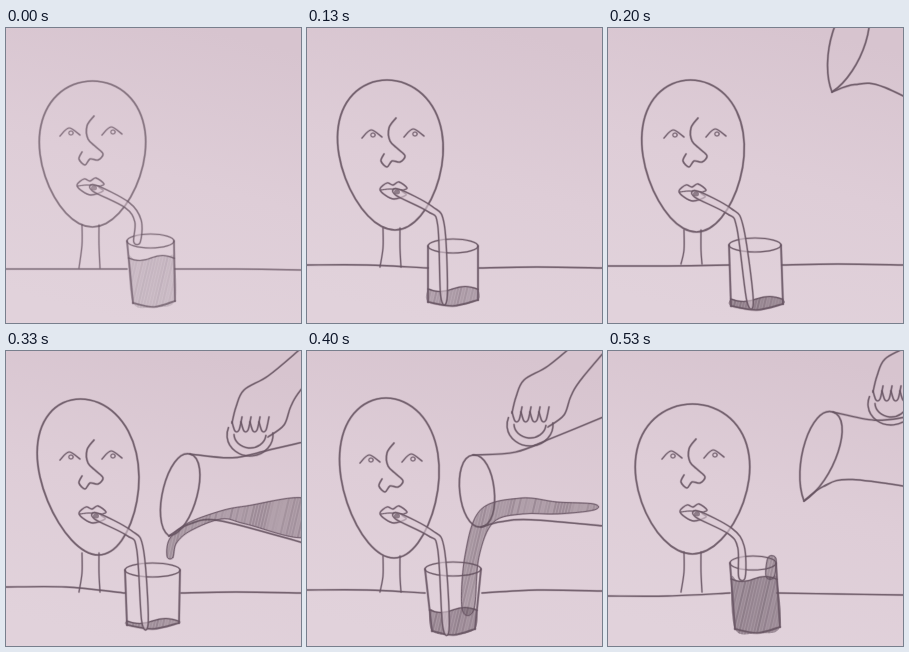
Animation, 295 px wide and 295 px high, one loop 590 ms. Source, as an HTML page with a canvas:

```html
<!DOCTYPE html>
<html lang="en">
<head>
<meta charset="utf-8">
<title>Refill</title>
<style>
  html, body { margin: 0; width: 100%; height: 100%; overflow: hidden; background: #dfcdd8; }
  canvas { display: block; width: 100vw; height: 100vh; }
</style>
</head>
<body>
<canvas id="stage"></canvas>
<script>
const SIZE = 295, LOOP = 590;
const canvas = document.getElementById('stage');
const ctx = canvas.getContext('2d');

// head: left, right, top, bottom, lean    table: heights at left, glass, right
// glass: rim and base as left, right, y   jug: lip ends, edge angles, waist depth, lip sharpness
// flow: liquid ribbon as x, y, radius
const full = {
  ink: .75, head: [34, 139, 53, 199, 0], nose: [88, 88], mouth: [85, 158], straw: [131, 214],
  table: [241, 241, 242], glass: { rim: [121, 168, 213], base: [127, 169, 275], level: 230, tone: .2 }
};
const drained = {
  ink: 1, head: [32, 136, 52, 202, 4], nose: [89, 90], mouth: [87, 162], straw: [137, 268],
  table: [237, 240, 240], glass: { rim: [121, 171, 218], base: [121, 171, 274], level: 261, tone: .34 }
};
const empty = {
  ink: 1, head: [35, 136, 52, 204, 3], nose: [90, 90], mouth: [85, 164], straw: [142, 272],
  table: [238, 237, 237], glass: { rim: [121, 173, 217], base: [123, 175, 278], level: 271, tone: .5 },
  jug: { top: [252, -25], tip: [224, 64], rise: 3, fall: 15, waist: 1, sharp: .3, hand: [67, -120] }
};
const tilting = {
  ink: 1, head: [34, 133, 48, 204, 9], nose: [88, 89], mouth: [87, 163], straw: [139, 270],
  table: [236, 242, 242], glass: { rim: [119, 174, 219], base: [121, 173, 274], level: 270, tone: .4 },
  jug: { top: [184, 103], tip: [163, 185], rise: -3, fall: 3, waist: 1, sharp: .1, hand: [0, 0] },
  flow: [[164, 206, 3], [167, 190, 4], [183, 176, 4], [215, 164, 4], [240, 164, 9], [300, 167, 19]]
};
const pouring = {
  ink: 1, head: [34, 132, 47, 207, 4], nose: [87, 92], mouth: [87, 163], straw: [139, 275],
  table: [239, 242, 240], glass: { rim: [118, 174, 218], base: [125, 168, 280], level: 259, tone: .45 },
  jug: { top: [166, 104], tip: [174, 176], rise: -12, fall: 0, waist: .4, sharp: 0, hand: [-21, -10] },
  flow: [[161, 258, 6], [165, 205, 7], [180, 165, 9], [215, 155, 8], [250, 157, 6], [287, 156, 3]]
};
const refilled = {
  ink: 1, head: [28, 141, 53, 203, 0], nose: [88, 88], mouth: [86, 161], straw: [134, 226],
  table: [245, 242, 244], glass: { rim: [122, 168, 212], base: [127, 172, 278], level: 228, tone: .48 },
  jug: { top: [225, 61], tip: [196, 150], rise: 3, fall: -4, waist: 1, sharp: .3, hand: [39, -31] },
  flow: [[162, 226, 4], [164, 207, 4]]
};

// Blends numbers, lists and objects; parts missing on either side drop out.
function mix(a, b, t) {
  if (typeof a === 'number') return a + (b - a) * t;
  if (Array.isArray(a)) return a.slice(0, b.length).map((v, i) => mix(v, b[i], t));
  return Object.fromEntries(Object.keys(a).filter(k => k in b).map(k => [k, mix(a[k], b[k], t)]));
}

const steps = [
  [0, full], [70, mix(full, drained, .5)], [130, drained],
  [200, empty], [270, mix(empty, tilting, .5)], [330, tilting],
  [400, pouring], [470, mix(pouring, refilled, .5)], [530, refilled]
];

// Shapes shared by all poses, relative to their anchor
const NOSE = [[0, 0], [-7, 10], [-6, 23], [2, 31], [9, 38], [4, 44], [-4, 43], [-9, 49], [-15, 43], [-12, 36]];
const LIPS = [[-14, -1], [-7, -7], [-1, -5], [5, -8], [13, -2], [8, 1], [12, 5], [0, 9], [-9, 5]];
const JUG_TOP = [[0, 0], [42, 6], [80, 0], [135, -10]];
const JUG_BASE = [[0, 0], [20, -13], [50, -18], [135, 0]];

const shift = (points, [x, y]) => points.map(p => [p[0] + x, p[1] + y]);
function turn(points, degrees) {
  const c = Math.cos(degrees * Math.PI / 180), s = Math.sin(degrees * Math.PI / 180);
  return points.map(([x, y]) => [x * c - y * s, x * s + y * c]);
}

// Catmull-Rom curve through the points
function curve(points, closed) {
  const path = new Path2D(), n = points.length;
  const at = i => closed ? points[(i + n) % n] : points[Math.max(0, Math.min(n - 1, i))];
  path.moveTo(...points[0]);
  for (let i = 0; i < (closed ? n : n - 1); i++) {
    const [a, b, c, d] = [at(i - 1), at(i), at(i + 1), at(i + 2)];
    path.bezierCurveTo(b[0] + (c[0] - a[0]) / 6, b[1] + (c[1] - a[1]) / 6,
      c[0] - (d[0] - b[0]) / 6, c[1] - (d[1] - b[1]) / 6, ...c);
  }
  return path;
}

// Closed band around a centre line of [x, y, radius]
function ribbon(spine) {
  const side = sign => spine.map(([x, y, r], i) => {
    const a = spine[Math.max(0, i - 1)], b = spine[Math.min(spine.length - 1, i + 1)];
    const dx = b[0] - a[0], dy = b[1] - a[1], k = sign * r / Math.hypot(dx, dy);
    return [x - dy * k, y + dx * k];
  });
  return curve([...side(1), ...side(-1).reverse()], true);
}

function pencil(path, width = 1.4) {
  ctx.strokeStyle = 'rgba(112,92,106,.28)';
  ctx.lineWidth = width + 1.1;
  ctx.stroke(path);
  ctx.strokeStyle = 'rgba(102,83,97,.82)';
  ctx.lineWidth = width;
  ctx.stroke(path);
}
const line = (points, width) => pencil(curve(points), width);
function oval(x, y, rx, ry, from = 0, to = 2 * Math.PI) {
  const path = new Path2D();
  path.ellipse(x, y, rx, ry, 0, from, to);
  return path;
}

// Flat tone under steep pencil strokes of uneven strength
function shade(path, tone) {
  let seed = 7;
  ctx.save();
  ctx.clip(path);
  ctx.fillStyle = `rgba(104,86,99,${tone})`;
  ctx.fillRect(0, 0, SIZE, SIZE);
  ctx.lineWidth = 2;
  for (let x = 0; x < SIZE * 1.3; x += 3) {
    seed = seed * 16807 % 2147483647;
    ctx.strokeStyle = `rgba(84,66,80,${tone * .7 * seed / 2147483647})`;
    ctx.stroke(curve([[x, 0], [x - 70, SIZE]]));
  }
  ctx.restore();
}

function drawPaper() {
  const light = ctx.createLinearGradient(200, 0, 120, SIZE);
  light.addColorStop(0, '#d7c4cf');
  light.addColorStop(.5, '#decdd7');
  light.addColorStop(1, '#e1d2db');
  ctx.fillStyle = light;
  ctx.fillRect(0, 0, SIZE, SIZE);
}

function drawHead({ head: [left, right, top, bottom, lean], nose, mouth, table }) {
  const egg = Array.from({ length: 20 }, (_, i) => {
    const c = Math.cos(i * Math.PI / 10), s = Math.sin(i * Math.PI / 10);
    return [(left + right) / 2 + (right - left) / 2 * c * (1 - .17 * s) + lean * s,
      (top + bottom) / 2 + (bottom - top) / 2 * s];
  });
  pencil(curve(egg, true), 1.6);

  for (const [dx, dy] of [[-24, 16], [18, 15]]) {
    const eye = [nose[0] + dx, nose[1] + dy];
    line(shift([[-10, 4], [-1, -4], [10, 3]], eye), 1.2);
    pencil(oval(eye[0] + 1, eye[1] + 1, 2.2, 2), .9);
  }
  line(shift(NOSE, nose), 1.5);

  pencil(curve(shift(LIPS, mouth), true), 1.3);
  line(shift([[-13, 0], [-4, -1], [8, 0]], mouth), 1);

  for (const [x, flare] of [[76, -3], [93, 1]])
    line([[x, bottom - 2], [x, bottom + 18], [x + flare, table[1] - 1]], 1.2);
}

function drawGlass({ rim: [left, right, top], base: [baseLeft, baseRight, bottom], level, tone }) {
  const k = (level - top) / (bottom - top);
  const l = left + (baseLeft - left) * k, r = right + (baseRight - right) * k;
  const surface = Array.from({ length: 9 }, (_, i) => [l + (r - l) * i / 8, level + 2.5 * Math.sin(i * .8)]);
  const floor = [[baseRight, bottom - 2], [(baseLeft + baseRight) / 2, bottom + 4], [baseLeft, bottom]];
  shade(curve([...surface, ...floor], true), tone);
  line(surface, 1.2);
  pencil(oval((left + right) / 2, top, (right - left) / 2, 7), 1.2);
  line([[left, top], [baseLeft, bottom]], 1.7);
  line([[right, top], [baseRight, bottom - 2]], 1.7);
  line(floor, 1.7);
}

function drawStraw({ mouth, straw }) {
  const spine = [...shift([[3, 2], [36, 19], [47, 35]], mouth), straw].map(p => [...p, 3.3]);
  const path = ribbon(spine);
  ctx.fillStyle = 'rgba(222,205,215,.6)';
  ctx.fill(path);
  pencil(path, 1.3);
  ctx.fillStyle = 'rgba(90,72,85,.6)';
  ctx.fill(oval(mouth[0] + 3, mouth[1] + 2, 3, 2.5));
}

function drawHand(offset) {
  ctx.save();
  ctx.translate(...offset);
  line([[330, -34], [292, 0], [262, 25], [238, 39], [230, 56], [226, 72]]);
  line([[345, -20], [297, 36], [285, 55], [278, 74], [262, 86]]);
  for (let x = 226; x < 260; x += 9) line([[x, 71], [x + 3, 80], [x + 7, 79], [x + 10, 66]]);
  pencil(oval(244, 84, 23, 21, -.1, 3.5));
  pencil(oval(244, 83, 16, 14, .1, 3.1));
  ctx.restore();
}

function drawJug({ top, tip, rise, fall, waist, sharp, hand }) {
  const dx = tip[0] - top[0], dy = tip[1] - top[1], bulge = 23 / Math.hypot(dx, dy);
  const lip = new Path2D();
  for (const side of [bulge, -bulge]) {
    const nx = -dy * side, ny = dx * side;
    lip.moveTo(...top);
    lip.bezierCurveTo(top[0] + nx, top[1] + ny,
      tip[0] + nx - dx * sharp, tip[1] + ny - dy * sharp, ...tip);
  }
  pencil(lip, 1.5);
  line(shift(turn(JUG_TOP, rise), top), 1.5);
  line(shift(turn(JUG_BASE.map(([x, y]) => [x, y * waist]), fall), tip), 1.5);
  drawHand(hand);
}

function drawFlow(spine) {
  const path = ribbon(spine);
  shade(path, .36);
  pencil(path, .9);
}

function draw(p) {
  const { glass, table } = p;
  drawPaper();
  ctx.globalAlpha = p.ink;
  line([[0, table[0]], [60, table[0]], [glass.rim[0], table[1]]]);
  line([[glass.rim[1] + 1, table[1]], [230, table[2] - 1], [SIZE, table[2]]]);
  drawHead(p);
  drawGlass(glass);
  drawStraw(p);
  if (p.jug) drawJug(p.jug);
  if (p.flow) drawFlow(p.flow);
  ctx.globalAlpha = 1;
}

function frame(now) {
  const w = Math.round(innerWidth * devicePixelRatio), h = Math.round(innerHeight * devicePixelRatio);
  if (canvas.width !== w || canvas.height !== h) {
    canvas.width = w;
    canvas.height = h;
  }
  ctx.setTransform(w / SIZE, 0, 0, h / SIZE, 0, 0);
  ctx.lineCap = ctx.lineJoin = 'round';
  const t = now % LOOP;
  draw(steps.findLast(([start]) => t >= start)[1]);
  requestAnimationFrame(frame);
}
frame(0);
</script>
</body>
</html>
```
